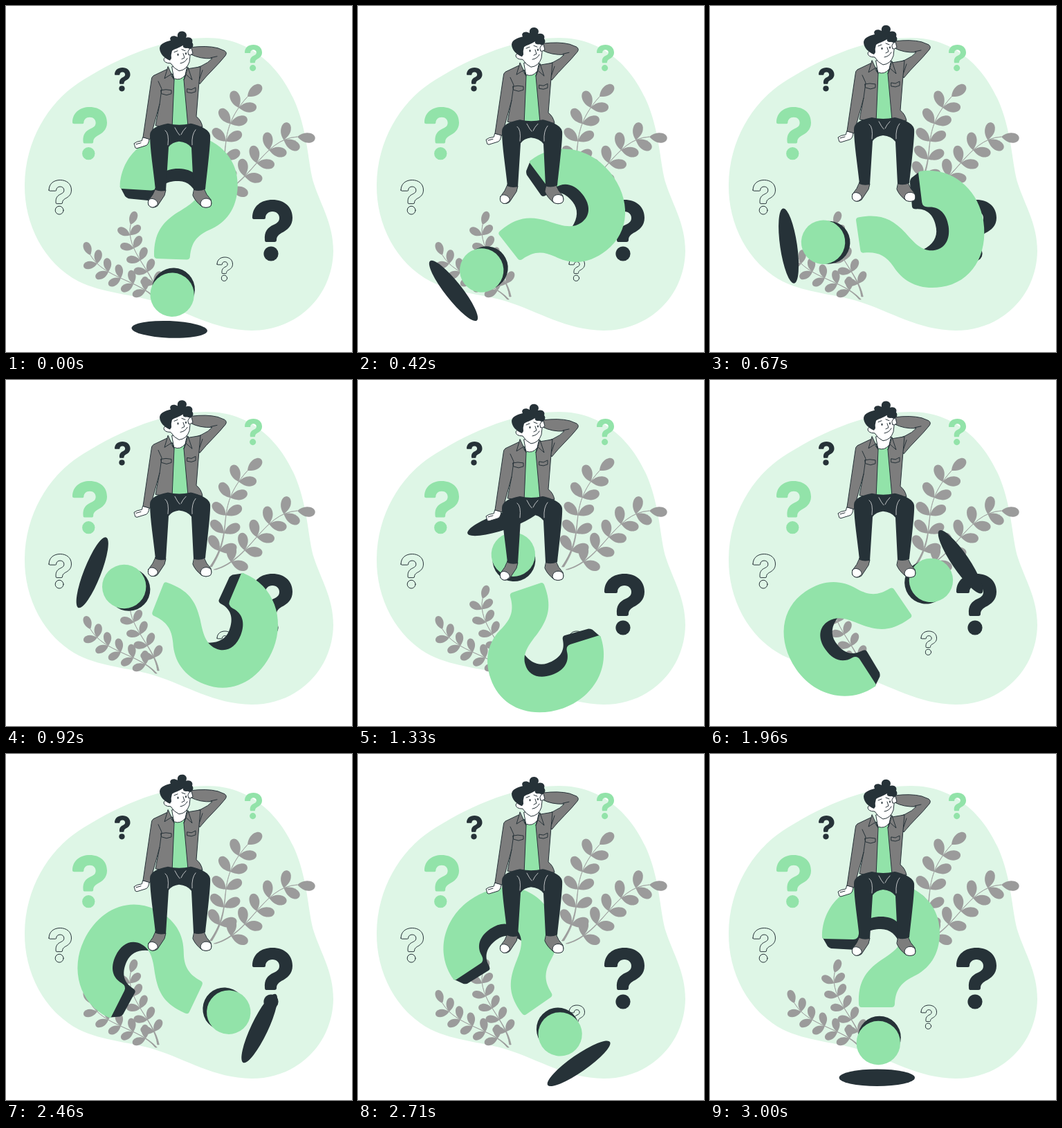
An HTML page that plays this animation: 500x500 px, repeating every 3040 ms.

```html
<!DOCTYPE html>
<html lang="en">
<head>
<meta charset="utf-8">
<title>Pondering a question</title>
<style>
  html, body { margin: 0; width: 100%; height: 100%; overflow: hidden; background: #fff; }
  svg { display: block; width: 100%; height: 100%; }
  .green { fill: #92e3a9; }
  .dark { fill: #263238; }
  .leaf { fill: #9b9b9b; }
  .stem { stroke: #9b9b9b; stroke-width: .7; }
  .gray { fill: #7d7d7d; }
  .white { fill: #fff; }
  .line { fill: none; }
  .ink { stroke: #263238; stroke-width: 1; stroke-linecap: round; stroke-linejoin: round; }
  .fold { fill: none; stroke: #fff; stroke-width: .7; stroke-linecap: round; }
</style>
</head>
<body>
<svg viewBox="0 0 500 500">
  <defs>
    <g id="query">
      <path d="M0 26C0 9 13 0 29 0C46 0 58 10 58 26C58 38 50 44 42 48C37 51 35 54 35 58Q35 61 32 61H20Q18 61 18 58C17 46 22 40 31 36C37 33 39 31 39 26C39 21 35 17 29 17C23 17 19 21 19 26Q19 28 17 28H3Q0 28 0 26Z" vector-effect="non-scaling-stroke"/>
      <circle cx="27" cy="78" r="10.6" vector-effect="non-scaling-stroke"/>
    </g>
    <path id="leaf" d="M0 0C5 -5 11 -8 18 -7C28 -5.5 28 4 20 6.500C13 8.500 7 6 0 0Z"/>
  </defs>

  <path fill="#def6e6" d="M27 258C28 195 60 141 105 111C150 82 220 46 290 46C355 46 395 90 415 133C437 180 436 230 445 257C455 288 473 315 473 354C472 420 420 469 355 469C300 468 262 442 215 427C180 416 140 415 105 398C55 372 26 315 27 258Z"/>
  <g id="plants" class="leaf"></g>

  <use href="#query" class="green" transform="translate(96 146) scale(.862)"/>
  <use href="#query" class="dark" transform="translate(157 89) scale(.388)"/>
  <use href="#query" class="green" transform="translate(345 56) scale(.431)"/>
  <use href="#query" class="dark" transform="translate(356 280)"/>
  <use href="#query" class="line ink" transform="translate(62 251.5) scale(.56)"/>
  <use href="#query" class="line ink" transform="translate(305 363) scale(.388)"/>

  <g id="spinner">
    <ellipse class="dark" cx="241.3" cy="467.7" rx="54.7" ry="12.3"/>
    <circle class="dark" cx="244.8" cy="409.7" r="31"/>
    <circle class="green" cx="243.3" cy="417.5" r="31.7"/>
    <path class="dark" d="M162 264L170 278Q172 280 175 281L211 283Q215 283 215.500 276C218 260 230 253 247 253C260 253 270 261 275 277L284 262L272 232H228L205 250Z"/>
    <path class="green" d="M162 264C162 216 202 184 247 184C296 184 332 214 332 258C332 290 317 311 293 322C275 331 268 342 267 361Q267 366 262 366H219Q215 366 215 361C214 330 224 314 247 298C264 287 277 278 278 262C279 245 266 235 247 235C227 235 216 245 215 260Q214 268 207 268L165 267Q162 267 162 264Z"/>
  </g>

  <g id="man">
    <!-- shoes -->
    <path class="gray ink" d="M216 264L231 266L229 274L219 289Q214 293 208 290Q204 287 206 281Q213 273 216 264Z"/>
    <path class="white ink" d="M206 281C208 277 216 278 219 284Q220 287 217 289Q212 293 208 290Q204 287 206 281Z"/>
    <path class="gray ink" d="M272 265L286 264Q289 273 296 280Q298 287 295 290Q289 293 283 290Q273 282 270 274Z"/>
    <path class="white ink" d="M281 286C281 278 291 276 296 281Q298 287 295 290Q289 293 283 290Z"/>
    <!-- resting hand -->
    <path class="white ink" d="M198 190L207 192Q206 201 202 202L189 206Q186 206 186 202L185 199Q188 196 196 195Z"/>
    <path class="line ink" d="M188 200L195 198"/>
    <!-- shirt and neck -->
    <path class="green ink" d="M241 103L259 102L264 176H239Z"/>
    <path class="white ink" d="M240 88L262 86L259 100Q252 109 243 105Z"/>
    <!-- raised arm -->
    <path class="gray ink" d="M267 60Q290 57 306 61L316 65Q320 68 317 72C306 86 292 98 280 113L269 92L282 87Q293 82 298 76Q280 77 267 70Z"/>
    <path class="line ink" d="M296 75L305 73M279 108L284 93"/>
    <!-- jacket -->
    <path class="gray ink" d="M232 92L213 101Q210 103 210 108L198 190L208 193L222 142L216 173L240 177L243 107Z"/>
    <path class="gray ink" d="M263 91L281 88L279 110L275 160Q282 165 284 175L263 174L257 107Z"/>
    <path class="line ink" d="M222 142L225 120L220 109M224 122L231 121L239 122V127L232 129L225 127ZM262 120L268 121L274 118V124L268 126L262 125Z"/>
    <path class="gray ink" d="M234 88L229 105L240 98L243 107L237 94ZM263 89L269 107L260 99L257 107L261 95Z"/>
    <!-- trousers -->
    <path class="dark" d="M208 187C208 178 218 173 234 170Q250 174 267 170C281 173 294 179 295 187C296 195 292 230 288 265Q279 269 271 266L268 205Q262 197 250 196Q240 197 235 204L231 267Q222 269 216 266C213 237 208 207 208 187Z"/>
    <path class="fold" d="M230 180Q236 184 234 201M244 176Q248 184 251 187M260 176Q255 181 253 186M274 179Q268 186 269 201"/>
    <!-- head -->
    <path class="white ink" d="M238 62L237 76Q231 71 228 77Q228 83 238 83Q243 91 250 94Q261 93 265 81L267 63L256 54Z"/>
    <path class="white ink" d="M263 66Q264 62 268 61L270 69Q266 72 264 71Z"/>
    <path class="dark" d="M237 79C229 76 222 69 222 61C223 54 231 52 238 50C235 45 241 41 248 45C247 39 251 36 256 37C261 38 262 43 260 46C266 44 271 48 269 53C273 58 268 64 262 61C257 62 255 59 256 57C250 61 244 62 240 65Q238 71 239 76Z"/>
    <path class="line ink" d="M243 67L248 65M254 63L259 65M256 69L258 75L254 77M252 83Q259 82 262 76"/>
    <ellipse class="dark" cx="248.500" cy="70.500" rx="1" ry="1.700"/>
    <ellipse class="dark" cx="260" cy="69" rx="1" ry="1.700"/>
  </g>
</svg>
<script>
const byId = id => document.getElementById(id);

function add(parent, tag, attrs) {
  const node = document.createElementNS('http://www.w3.org/2000/svg', tag);
  for (const key in attrs) node.setAttribute(key, attrs[key]);
  parent.appendChild(node);
  return node;
}

// A tapering stem from root to tip, with evenly spaced leaf pairs and one end leaf.
function addPlant(root, bend1, bend2, tip, size) {
  const PAIRS = 5, SPACING = .173, SPREAD = 54;
  const plants = byId('plants');
  const [x, y] = root;
  const curve = add(plants, 'path', { d: `M${root}C${bend1} ${bend2} ${tip}`, fill: 'none' });
  const length = curve.getTotalLength();
  const width = 1.6 * size;
  add(plants, 'path', {
    class: 'stem',
    d: `M${x - width} ${y}C${bend1} ${bend2} ${tip}C${bend2} ${bend1} ${x + width} ${y}Z`
  });

  function addLeaf(fraction, turn) {
    const at = curve.getPointAtLength(fraction * length);
    const before = curve.getPointAtLength(fraction * length - 2);
    const angle = Math.atan2(at.y - before.y, at.x - before.x) * 180 / Math.PI + turn;
    add(plants, 'use', {
      href: '#leaf', transform: `translate(${at.x} ${at.y}) rotate(${angle}) scale(${size})`
    });
  }

  addLeaf(1, 10);
  for (let pair = 1; pair <= PAIRS; pair++) {
    addLeaf(pair * SPACING, -SPREAD);
    addLeaf(pair * SPACING, SPREAD);
  }
}

addPlant([296, 270], [333, 215], [298, 188], [349, 131], 1);
addPlant([302, 274], [355, 259], [370, 192], [421, 189], 1);
addPlant([220, 420], [215, 385], [172, 354], [180, 316], .78);
addPlant([217, 424], [193, 396], [142, 394], [122, 360], .78);

const LOOP = 3040, STEP = 1000 / 24, STEPS = 72, LEAD = 18;
const TURN = 3000, FLOAT = 1500, RISE = 10;

function render(time) {
  const step = Math.min(STEPS, Math.floor((time % LOOP + 4.9) / STEP));
  const ms = LEAD + step * (TURN - LEAD) / STEPS;
  const lift = RISE * (1 - Math.abs(1 - 2 * (ms % FLOAT) / FLOAT));
  byId('spinner').setAttribute('transform', `rotate(${360 * ms / TURN} 247.5 333.3)`);
  byId('man').setAttribute('transform', `translate(0 ${-lift})`);
}

const start = performance.now();
function tick() {
  render(performance.now() - start);
  requestAnimationFrame(tick);
}
tick();
</script>
</body>
</html>
```
